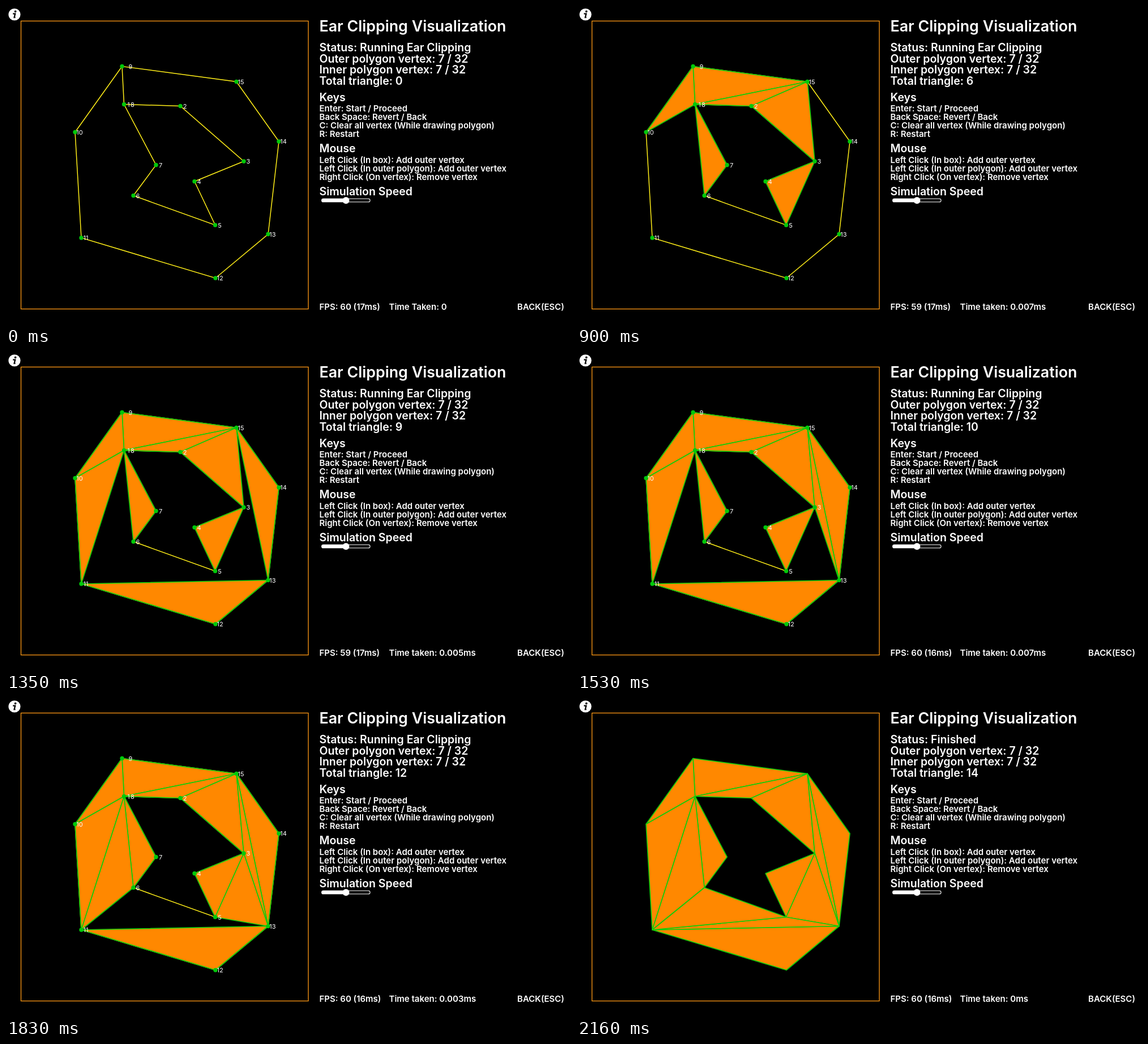
Write an HTML page that moves like this. It is 998x561 px and loops after 2190 ms.

```html
<!DOCTYPE html>
<html lang="en">
<head>
<meta charset="utf-8">
<title>Ear Clipping Visualization</title>
<style>
  html, body { margin: 0; width: 100%; height: 100%; overflow: hidden; background: #000; }
  svg { display: block; width: 998px; height: 561px; }
  text { font-family: Inter, Roboto, sans-serif; font-weight: 600; fill: #fff; white-space: pre; }
  .title { font-size: 26.8px; }
  .head { font-size: 19.5px; }
  .body { font-size: 15px; }
  .label { font-size: 11px; font-weight: 400; text-anchor: middle; }
  .edge { fill: none; stroke: #ffee18; stroke-width: 1.5; }
  .ear { fill: #ff8800; stroke: #14cc0a; stroke-width: 1.7; stroke-linejoin: round; }
  .dot { fill: #00c80a; }
</style>
</head>
<body>
<svg viewBox="0 0 998 561">
  <rect width="998" height="561"/>
  <rect x="26.5" y="26.5" width="507.5" height="508" fill="none" stroke="#ff9814" stroke-width="1.3"/>
  <circle cx="15" cy="15" r="10.6" fill="#fff"/>
  <circle cx="16.6" cy="9.6" r="1.9"/>
  <path d="M12.2 13.6H16.2L14.6 20.2H16.6" fill="none" stroke="#000" stroke-width="2.3"/>
  <g id="edges"></g>
  <g id="ears"></g>
  <g id="marks"></g>
  <g id="panel"></g>
  <rect x="557.6" y="340" width="85.4" height="5.8" rx="2.9" fill="none" stroke="#fff" stroke-width="1.1"/>
  <rect x="557.6" y="340" width="43" height="5.8" rx="2.9" fill="#fff"/>
  <circle cx="600.5" cy="343" r="6" fill="#fff"/>
</svg>
<script>
const LOOP = 2190, FIRST = 81, STEP = 153;

const hole = [
  [208.5, 173.5], [308, 176.5], [420, 274], [333, 309.5], [369.5, 386.5], [225, 334.5], [265, 280.5]
];
const outer = [
  [205, 106.5], [122, 222.5], [133, 409], [370, 480], [463, 402.5], [482, 239], [407, 133.5]
];
// Both rings joined by a bridge, so the first point of each appears twice.
const ring = [...hole, hole[0], ...outer, outer[0]];

const cross = (a, b, c) => (b[0] - a[0]) * (c[1] - b[1]) - (b[1] - a[1]) * (c[0] - b[0]);

const inside = (p, [a, b, c]) => cross(a, b, p) < 0 && cross(b, c, p) < 0 && cross(c, a, p) < 0;

// Walk around the ring from its last point, cutting each ear met on the way.
function clipEars(points) {
  const left = [...points], found = [];
  let at = left.length - 1;
  while (left.length > 2) {
    const size = left.length;
    const tri = [-1, 0, 1].map(d => left[(at + d + size) % size]);
    if (cross(...tri) < 0 && !left.some(p => inside(p, tri))) {
      found.push(tri);
      left.splice(at, 1);
    } else {
      at++;
    }
    at %= left.length;
  }
  return found;
}

const byId = id => document.getElementById(id);

function add(parent, tag, attrs, content = "") {
  const el = document.createElementNS("http://www.w3.org/2000/svg", tag);
  for (const key in attrs) el.setAttribute(key, attrs[key]);
  el.textContent = content;
  return byId(parent).appendChild(el);
}

const write = (cls, y, content = "", x = 553.5) => add("panel", "text", { class: cls, x, y }, content);

const ears = clipEars(ring);
add("edges", "polygon", { class: "edge", points: ring.join(" ") });
const earShapes = ears.map(tri => add("ears", "polygon", { class: "ear", points: tri.join(" ") }));

for (const [cx, cy] of [...hole, ...outer]) add("marks", "circle", { class: "dot", cx, cy, r: 3.7 });
ring.slice(0, -1).forEach(([x, y], i) => {
  const onBridge = i === hole.length || i === hole.length + 1;
  add("marks", "text", { class: "label", x: x + (onBridge ? 15 : 8), y: y + 4 }, i + 1);
});

write("title", 45, "Ear Clipping Visualization");
const [status, , , total] = [
  "", "Outer polygon vertex: 7 / 32", "Inner polygon vertex: 7 / 32", ""
].map((line, i) => write("head", 80 + i * 19.6, line));

const sections = {
  "Keys": [
    "Enter: Start / Proceed",
    "Back Space: Revert / Back",
    "C: Clear all vertex (While drawing polygon)",
    "R: Restart"
  ],
  "Mouse": [
    "Left Click (In box): Add outer vertex",
    "Left Click (In outer polygon): Add outer vertex",
    "Right Click (On vertex): Remove vertex"
  ],
  "Simulation Speed": []
};
let y = 167.5;
for (const name in sections) {
  write("head", y, name);
  sections[name].forEach((line, i) => write("body", y + 18.6 + i * 14.9, line));
  y += 31 + sections[name].length * 14.9;
}

const fps = write("body", 536);
const taken = write("body", 536, "", 676.5);
write("body", 536, "BACK(ESC)", 986).setAttribute("text-anchor", "end");

function setText(el, value) {
  if (el.textContent !== value) el.textContent = value;
}

function timeText(count) {
  if (!count) return "Time Taken: 0";
  if (count === ears.length) return "Time taken: 0ms";
  const micros = (3 + 2 * (count % 4)) % 9;
  return `Time taken: ${(micros / 1000).toFixed(3)}ms`;
}

function render(t) {
  const count = Math.max(0, Math.min(ears.length, Math.floor((t - FIRST) / STEP) + 1));
  const done = count === ears.length;
  earShapes.forEach((el, i) => el.setAttribute("visibility", i < count ? "visible" : "hidden"));
  for (const id of ["edges", "marks"]) byId(id).setAttribute("visibility", done ? "hidden" : "visible");
  setText(status, done ? "Status: Finished" : "Status: Running Ear Clipping");
  setText(total, `Total triangle: ${count}`);
  setText(fps, t < 630 ? "FPS: 60 (17ms)" : t < 1530 ? "FPS: 59 (17ms)" : "FPS: 60 (16ms)");
  setText(taken, timeText(count));
}

const start = performance.now();
function tick() {
  render((performance.now() - start) % LOOP);
  requestAnimationFrame(tick);
}
tick();
</script>
</body>
</html>
```
